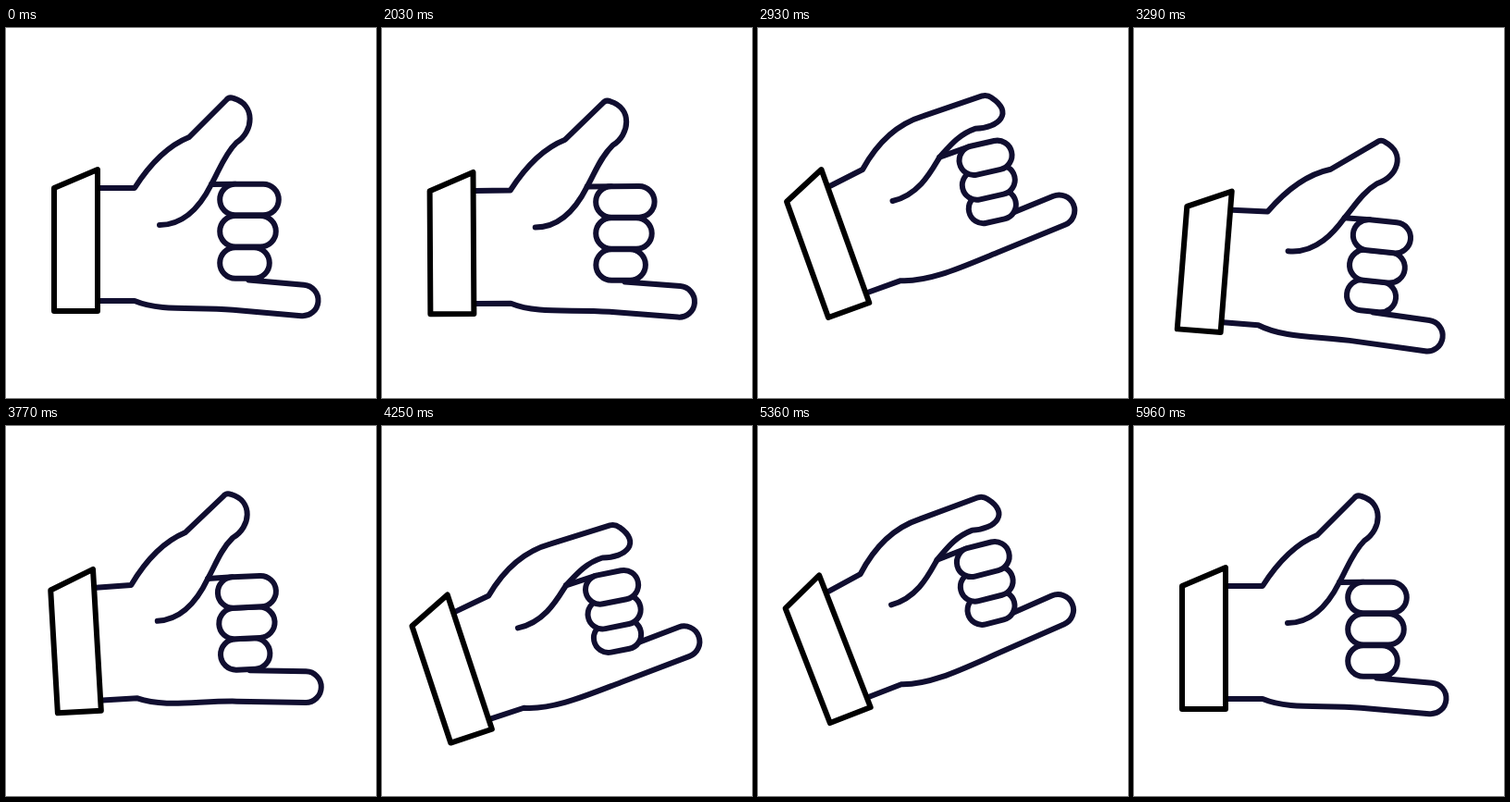
An HTML page with a canvas for the animation above (5990 ms loop, 400 by 400 pixels).

```html
<!DOCTYPE html>
<html lang="en">
<head>
<meta charset="utf-8">
<title>Call me</title>
<style>
  html, body { margin: 0; width: 100%; height: 100%; overflow: hidden; background: #fff; }
  canvas { display: block; }
</style>
</head>
<body>
<canvas id="stage" width="400" height="400"></canvas>
<script>
const ctx = document.getElementById("stage").getContext("2d");

const LOOP = 5990, START = 2000, STEP = 30;
const CYCLE = 20, SWING_END = 120, REST = 132;
const INK = "#100e30";
const rad = deg => deg * Math.PI / 180;

const ease = p => (1 - Math.cos(Math.PI * Math.min(1, Math.max(0, p)))) / 2;
const tween = (k, k0, k1, a, b) => a + (b - a) * ease((k - k0) / (k1 - k0));

// The wrist rocks behind the beat, then overshoots a little and settles.
function tilt(k) {
  const mid = -8.5, swing = 13.1, low = mid - swing;
  const firstLow = 12.7, lastLow = firstLow + 100, over = 126;
  if (k < firstLow) return tween(k, 0, firstLow, 0, low);
  if (k < lastLow) return mid - swing * Math.cos(2 * Math.PI * (k - firstLow) / CYCLE);
  return k < over ? tween(k, lastLow, over, low, 1.8) : tween(k, over, REST, 1.8, 0);
}

function curl(k) {
  if (k >= SWING_END) return 0;
  const p = k % CYCLE;
  return p < 10 ? ease(p / 10) : 1 - ease((p - 15) / 5);
}

const bob = k => k < SWING_END ? 32.7 * (1 - Math.cos(4 * Math.PI * k / CYCLE)) / 2 : 0;

// Thumb points turn around the palm, more the further out they are.
function bend(x, y, c) {
  const px = 166, py = 213;
  const r = Math.hypot(x - px, y - py);
  const a = Math.atan2(y - py, x - px) + rad(0.21 * r * c);
  const reach = r * (1 - 0.025 * c);
  return [px - 6 * c + reach * Math.cos(a), py - 2 * c + reach * Math.sin(a)];
}

function drawThumb(c) {
  const p = (x, y) => bend(x, y, c);
  ctx.beginPath();
  ctx.moveTo(101, 173);
  ctx.lineTo(...p(139, 173));
  ctx.bezierCurveTo(...p(155, 148), ...p(173, 128), ...p(198, 118));
  ctx.lineTo(...p(238, 78));
  ctx.quadraticCurveTo(...p(241, 74), ...p(246, 76));
  ctx.bezierCurveTo(...p(270, 83), ...p(268, 112), ...p(249, 124));
  ctx.bezierCurveTo(...p(236, 137), ...p(230, 155), ...p(222, 169));
  ctx.bezierCurveTo(...p(214, 185), ...p(197, 213), ...p(166, 213));
  ctx.stroke();
}

function drawPinky(c) {
  const r = 16.8, a = rad(5 - 7.5 * c), length = 74 + 5 * c;
  const along = (u, v) => [
    247 + u * Math.cos(a) - v * Math.sin(a),
    288 - 3 * c + u * Math.sin(a) + v * Math.cos(a)
  ];
  ctx.beginPath();
  ctx.moveTo(101, 295);
  ctx.lineTo(139, 295);
  ctx.bezierCurveTo(168, 307, ...along(-42, r), ...along(0, r));
  ctx.arc(...along(length, 0), r, a + Math.PI / 2, a - Math.PI / 2, true);
  ctx.lineTo(...along(14, -r));
  ctx.stroke();
}

function drawFingers(c) {
  const r = 16.8 - c, q = Math.PI / 2;
  const left = i => [248 + c * (1.5 + 2 * i * i), 254 - 2 * c - i * (34.25 - 8 * c)];

  const [topX, topY] = left(2);
  ctx.beginPath();
  ctx.moveTo(...bend(222, 169, c));
  ctx.lineTo(topX, topY - r);
  ctx.stroke();

  [20, 27, 30].forEach((width, i) => {
    ctx.save();
    ctx.translate(...left(i));
    ctx.rotate(rad(7 * c));
    ctx.beginPath();
    ctx.arc(0, 0, r, q, 3 * q);
    ctx.arc(width - i * i * c, 0, r, -q, q);
    ctx.closePath();
    ctx.fill();
    ctx.stroke();
    ctx.restore();
  });
}

function drawCuff() {
  ctx.beginPath();
  ctx.moveTo(52, 173);
  ctx.lineTo(99, 153);
  ctx.lineTo(99, 306);
  ctx.lineTo(52, 306);
  ctx.closePath();
  ctx.fill();
  ctx.stroke();
}

function render(ms) {
  const k = Math.min(REST, Math.max(0, Math.floor((ms - START) / STEP)));
  const c = curl(k);

  ctx.setTransform(1, 0, 0, 1, 0, 0);
  ctx.fillStyle = "#fff";
  ctx.fillRect(0, 0, 400, 400);
  ctx.translate(75, 239 + bob(k));
  ctx.rotate(rad(tilt(k)));
  ctx.translate(-75, -239);

  ctx.lineWidth = 6;
  ctx.lineCap = ctx.lineJoin = "round";
  ctx.strokeStyle = INK;
  drawPinky(c);
  drawThumb(c);
  drawFingers(c);
  ctx.strokeStyle = "#000";
  drawCuff();
}

function tick() {
  render(performance.now() % LOOP);
  requestAnimationFrame(tick);
}
tick();
</script>
</body>
</html>
```
